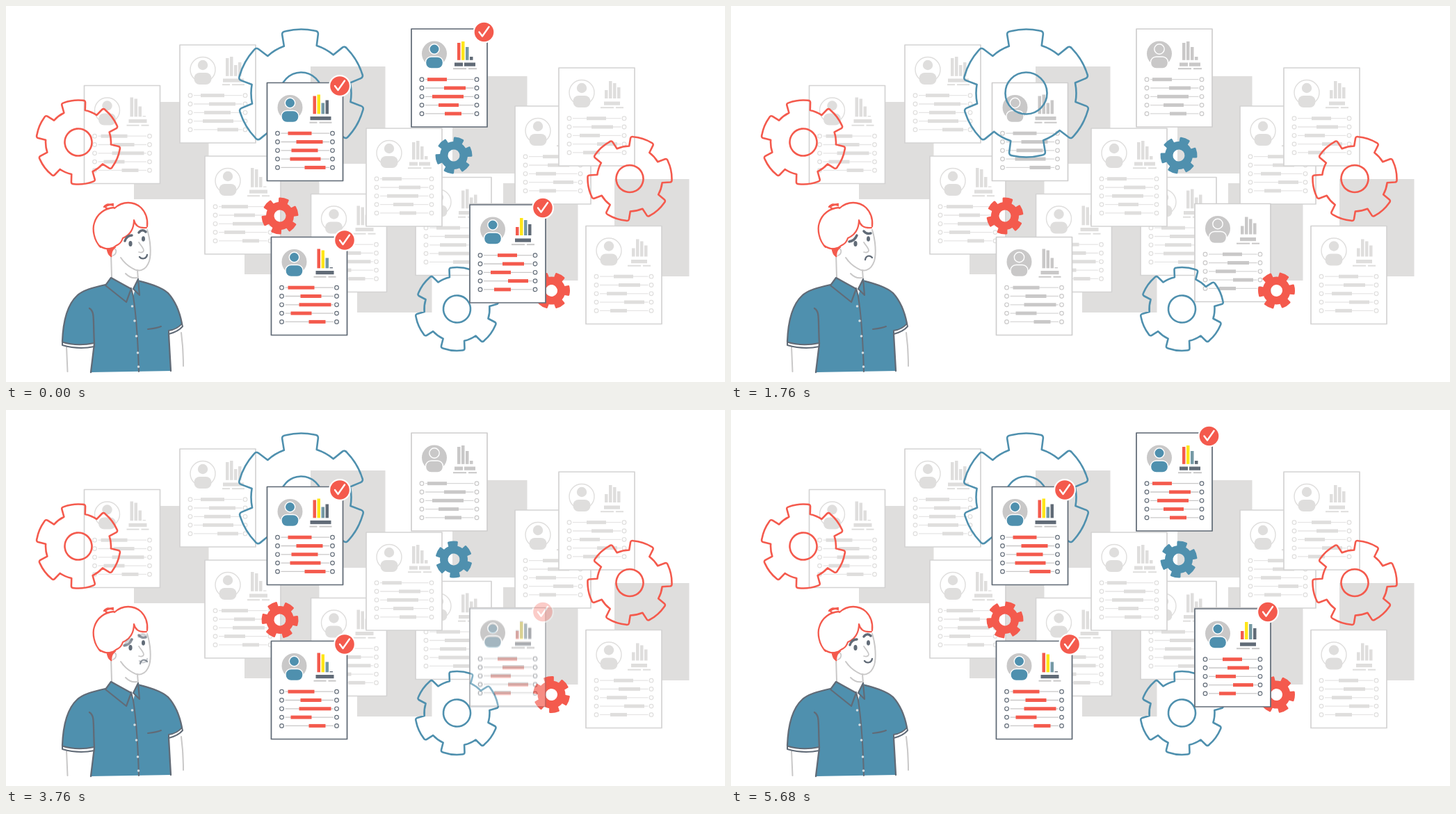
An HTML page for the animation above (5760 ms loop, 1034 by 541 pixels).

```html
<!DOCTYPE html>
<html lang="en">
<head>
<meta charset="utf-8">
<title>Choosing candidates</title>
<style>
html, body { margin: 0; width: 100%; height: 100%; overflow: hidden; background: #fff; }
svg { display: block; width: 1034px; height: 541px; }
</style>
</head>
<body>
<svg id="stage" viewBox="0 0 1034 541" fill="none" stroke-linecap="round" stroke-linejoin="round"></svg>
<script>
const RED = '#f45a4d', BLUE = '#4f90ae', DARK = '#616b77', GRAY = '#c9c8c8', FAINT = '#dfdedd';
const LOOP = 5760, STEP = 80, FADE = 400;
const HOLD_START = 1760, HOLD = 640;

const themes = {
  color: { border: DARK, bars: [RED, '#ffe619', '#7599a5', DARK], label: DARK, disc: GRAY, person: BLUE, seg: RED, ring: DARK, line: GRAY },
  gray: { border: '#cfcece', bars: Array(4).fill(GRAY), label: GRAY, disc: GRAY, person: GRAY, seg: GRAY, ring: GRAY, line: '#d8d7d7' },
  faint: { border: '#d4d3d3', bars: Array(4).fill(FAINT), label: FAINT, disc: '#fff', person: FAINT, seg: FAINT, ring: FAINT, line: '#e6e5e5' }
};

// Row segments are [start, end]; tops are the upper ends of the four chart bars.
const kinds = {
  a: { tops: [19, 17, 29, 25], labels: [[62, 92]], notes: [[61, 72], [75, 93]], segs: [[30, 64], [42, 80], [35, 73], [33, 77], [54, 84]] },
  b: { tops: [17, 19, 30, 43.5], labels: [[64, 90]], notes: [[61, 79], [82, 93]], segs: [[24, 62], [42, 72], [40, 86], [28, 58], [54, 78]] },
  c: { tops: [32, 19, 22, 28], labels: [[65, 88]], notes: [[60, 79], [82, 93]], segs: [[40, 68], [47, 78], [30, 59], [55, 84], [35, 59]] },
  d: { tops: [20, 18, 26, 40], labels: [[62, 74], [76, 92]], notes: [[60, 79], [82, 94]], segs: [[23, 51], [47, 78], [30, 75], [39, 68], [48, 72]] }
};

const rect = (x, y, w, h, fill, extra = '') =>
  `<rect x="${x}" y="${y}" width="${w}" height="${h}" fill="${fill}" ${extra}/>`;
const circle = (x, y, r, attrs) => `<circle cx="${x}" cy="${y}" r="${r}" ${attrs}/>`;
const path = (d, stroke, width = 2, fill = 'none') =>
  `<path d="${d}" stroke="${stroke}" stroke-width="${width}" fill="${fill}"/>`;
const group = (content, attrs) => `<g ${attrs}>${content}</g>`;

function card(x, y, kindName, themeName) {
  const kind = kinds[kindName], theme = themes[themeName];
  const faint = themeName === 'faint';
  const outline = faint ? '' : 'stroke="#fff" stroke-width="1.4"';
  let out = rect(0, 0, 109, 141, '#fff', `stroke="${theme.border}" stroke-width="1.7"`);
  out += circle(33, 35.5, 18, `fill="${theme.disc}" ${faint ? `stroke="${FAINT}" stroke-width="1.4"` : ''}`);
  out += rect(20.5, 40, 25, 17, theme.person, `rx="8" ${outline}`);
  out += circle(33, 29, 7.2, `fill="${theme.person}" ${outline}`);
  const floor = kindName === 'c' ? 44 : 44.8;
  kind.tops.forEach((top, i) => { out += rect(66 + 6 * i, top, 4.5, floor - top, theme.bars[i]); });
  kind.labels.forEach(([a, b]) => { out += rect(a, 48.5, b - a, 5.2, theme.label); });
  kind.notes.forEach(([a, b]) => { out += rect(a, 56.2, b - a, 2, faint ? FAINT : GRAY); });
  kind.segs.forEach(([a, b], i) => {
    const rowY = 72.7 + 12.3 * i;
    out += path(`M20.5 ${rowY}H89`, theme.line, 1.3);
    out += rect(a, rowY - 2.5, b - a, 5, theme.seg);
    for (const cx of [15, 94]) out += circle(cx, rowY, 2.8, `fill="#fff" stroke="${theme.ring}" stroke-width="1.2"`);
  });
  return group(out, `transform="translate(${x} ${y})"`);
}

function chosenCard(id, x, y, kind, badgeX, badgeY) {
  const badge = circle(0, 0, 16, 'fill="#fff"') + circle(0, 0, 13.8, `fill="${RED}"`) +
    path('M-7 0L-2.5 6L7 -7.5', '#fff', 2.4);
  return group(card(x, y, kind, 'color') +
    group(badge, `transform="translate(${badgeX} ${badgeY})"`), `id="${id}"`);
}

function gearPath(outer, inner, hole) {
  const at = (r, deg) => {
    const a = deg * Math.PI / 180;
    return `${(r * Math.sin(a)).toFixed(2)} ${(-r * Math.cos(a)).toFixed(2)}`;
  };
  let d = `M${at(inner, -19)}`;
  for (let tooth = 0; tooth < 360; tooth += 60) {
    d += `L${at(outer * .96, tooth - 17)}Q${at(outer * 1.01, tooth - 16.5)} ${at(outer, tooth - 13)}`;
    d += `A${outer} ${outer} 0 0 1 ${at(outer, tooth + 13)}`;
    d += `Q${at(outer * 1.01, tooth + 16.5)} ${at(outer * .96, tooth + 17)}L${at(inner, tooth + 19)}`;
    d += `A${inner} ${inner} 0 0 1 ${at(inner, tooth + 41)}`;
  }
  return `${d}ZM${hole} 0A${hole} ${hole} 0 1 0 ${-hole} 0A${hole} ${hole} 0 1 0 ${hole} 0Z`;
}

const outlineGear = (x, y, outer, inner, hole, angle, color) =>
  group(path(gearPath(outer, inner, hole), color, 2.6), `transform="translate(${x} ${y}) rotate(${angle})"`);

const spinners = [
  { x: 644, y: 215, color: BLUE, angle: 17, turn: 1 },
  { x: 394, y: 302, color: RED, angle: 13, turn: -1 },
  { x: 784.5, y: 409.5, color: RED, angle: 30, turn: -1 }
];
const spinner = (s, i) => `<path id="spin${i}" d="${gearPath(26.5, 20, 8.5)}" fill="${s.color}" fill-rule="evenodd"/>`;

function man() {
  const skin = '#c9c8c8';
  const shirt = 'M150 391L143 401C125 405 110 409 102 417C88 430 82 455 81 483C95 488 112 489 127 486L122 527L237 525L234 467C242 466 249 462 253 457C250 441 243 424 233 413C222 403 205 399 190 394L183 410Z';
  let out = '';
  out += path('M87 490L88.5 526M252 470C254 485 255 500 255 518', skin);
  out += path('M151 356L152 390L182 412L190 393L189 380', skin, 2, '#fff');
  out += path(shirt, 'none', 0, BLUE);
  out += path('M81 483.5C95 488 112 488 127 485V490C112 493 95 492 81 488Z', DARK, 2, '#fff');
  out += path('M234 467C242 466 249 462 253 457L254 461C249 467 242 470 234 472Z', DARK, 2, '#fff');
  out += path('M143 401C125 405 110 409 102 417C88 430 82 455 81 483M193 396C207 400 223 404 233 413C243 424 250 441 253 457M120 435C128 440 125 449 127 486L122 527M234 472L237 525', DARK, 2.3);
  out += path('M152 390L180 407L183 417L190 393', 'none', 0, '#fff');
  out += path('M151 391L143 402L173 426L180 407ZM190 393L192 416L183 407L190 393', DARK, 2.2, BLUE);
  out += path('M180 406L183 418C188 450 190 490 191 526M204 465C212 464 219 463 223 461', DARK, 2);
  for (const [x, y] of [[181.5, 432], [185, 453], [187.5, 475], [189.5, 499], [190.5, 519]])
    out += circle(x, y, 1.8, 'fill="#d5dde1"');
  out += path('M203 322C208 337 209 357 206 367C201 382 190 383 181 377C174 373 169 368 165 362M172 385C177 390 183 392 188 391', skin);
  out += path('M155 349C160 350 159 357 154 359', skin, 1.7);
  out += path('M191 340C194 345 198 348 198 352C197 355 194 355 191 354', skin, 1.7);
  out += path('M134 345C126 335 124 321 127 312C131 297 143 290 157 290C168 281 184 280 194 290C202 298 204 308 203 317L187 316L185 309C184 322 176 330 168 334C165 343 158 348 147 349Z', 'none', 0, '#fff');
  out += path('M136 347C126 337 124 321 127 312C131 299 142 291 155 290M141 289C145 284 149 285 154 287M147 292C141 290 141 287 154 285M156 291C168 280 184 281 194 290C202 298 204 308 203 317', RED, 2.3);
  out += path('M134 345C142 350 151 351 158 345C164 342 166 340 168 334C177 330 184 322 184 308C186 317 193 320 202 319', RED, 2.2);
  out += path('M145 349L158 347C154 350 151 354 152 361C148 360 146 355 145 349Z', RED, 1, RED);
  out += '<ellipse cx="179" cy="342" rx="2.6" ry="4" fill="#616b77"/><ellipse cx="197.5" cy="335" rx="2.5" ry="3.8" fill="#616b77"/>';
  out += group(path('M171 338C173 332 177 330 181 330M191 326C194 322 198 322 201 325', DARK, 3.5) +
    path('M192 361C195 365 202 364 203 358', DARK, 2.3), 'id="happy"');
  out += group(path('M170 339C176 338 179 335 181 330M191 324C194 328 197 328 201 327', DARK, 3.5) +
    path('M193 365C194 359 200 358 203 362', DARK, 2.3), 'id="sad"');
  return out;
}

const shadows = [[184, 138], [438, 87], [642, 101], [343, 246], [505, 301], [715, 255], [875, 249]];
const backCards = [[250, 56, 'a'], [112.5, 114.5, 'b'], [286, 216, 'b'], [438.5, 270.5, 'b'], [589, 246.5, 'a'],
  [518, 176, 'd'], [732, 144, 'c'], [795, 89, 'c'], [834, 316.5, 'c']];

document.getElementById('stage').innerHTML = [
  ...shadows.map(([x, y]) => rect(x, y, 107.5, 140, FAINT)),
  ...backCards.map(([x, y, kind]) => card(x, y, kind, 'faint')),
  card(375.5, 110.5, 'a', 'gray'),
  card(381.5, 332.5, 'b', 'gray'),
  card(667, 284.5, 'c', 'gray'),
  card(583, 33, 'd', 'gray'),
  outlineGear(424.5, 125.5, 92, 72, 30, -1, BLUE),
  outlineGear(104, 196, 60.5, 47, 19.5, -7, RED),
  outlineGear(648.5, 436, 60, 47, 19.5, 6, BLUE),
  outlineGear(897, 248.5, 60.5, 47, 19.5, 18, RED),
  ...spinners.map(spinner),
  chosenCard('cardA', 375.5, 110.5, 'a', 480, 115),
  chosenCard('cardB', 381.5, 332.5, 'b', 487, 337),
  chosenCard('cardC', 667, 286, 'c', 772, 290.5),
  chosenCard('cardD', 583, 33, 'd', 687.5, 37.5),
  man()
].join('');

const byId = id => document.getElementById(id);
const ramp = (t, start) => Math.min(1, Math.max(0, (t - start) / FADE));
const visible = (t, out, back) => 1 - ramp(t, out) + ramp(t, back);
const fades = { cardC: [400, 3640], happy: [400, 3640], cardA: [720, 3300], cardB: [1040, 3060], cardD: [1360, 4380] };

function render(ms) {
  const t = Math.floor((ms % LOOP) / STEP) * STEP;
  for (const id in fades) byId(id).setAttribute('opacity', visible(t, ...fades[id]));
  byId('sad').setAttribute('opacity', 1 - visible(t, ...fades.happy));
  // The gears rest while every card is deselected.
  const moving = t < HOLD_START + HOLD + STEP ? Math.min(t, HOLD_START) : t - HOLD;
  const turned = 360 * moving / (LOOP - HOLD);
  spinners.forEach((s, i) =>
    byId('spin' + i).setAttribute('transform', `translate(${s.x} ${s.y}) rotate(${s.angle + s.turn * turned})`));
}

const began = performance.now();
function tick() {
  render(performance.now() - began);
  requestAnimationFrame(tick);
}
tick();
</script>
</body>
</html>
```
